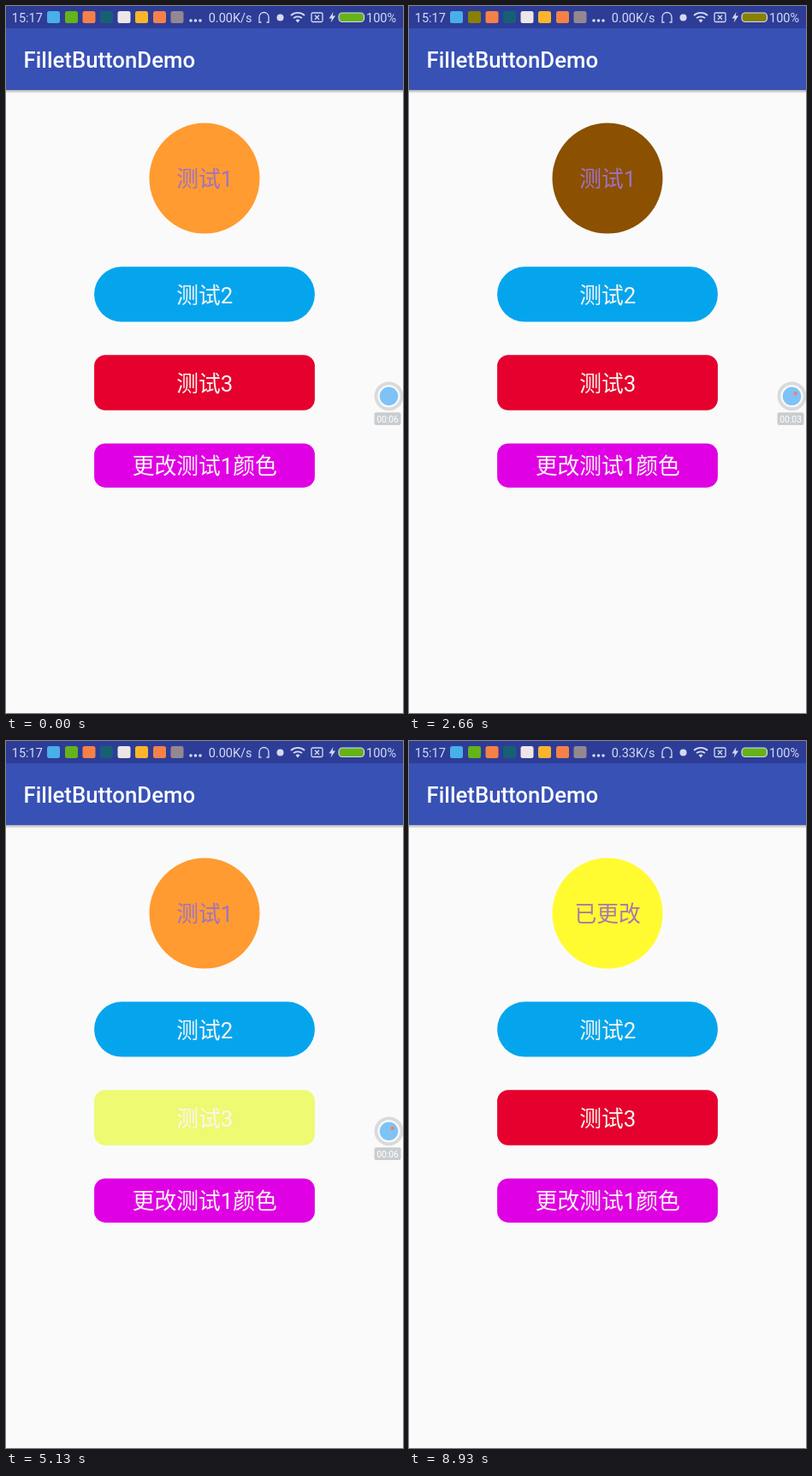
These frames come from a looping animation (464x825 px, 9310 ms). An HTML page:

```html
<!DOCTYPE html>
<html lang="zh-CN">
<head>
<meta charset="utf-8">
<title>FilletButtonDemo</title>
<style>
  html, body { margin: 0; width: 100%; height: 100%; overflow: hidden; background: #fafafa; }
  svg { display: block; }
  text { font-family: Roboto, "Noto Sans CJK SC", "Noto Sans CJK", sans-serif; }
  .label { font-size: 25.78px; font-weight: 300; fill: #f8f6f2; text-anchor: middle; }
  .label tspan { font-weight: 400; }
  .status { font-size: 14.5px; fill: #d6daf0; }
  .clock { font-size: 10.3px; fill: #fff; }
  .line { fill: none; stroke: #d6daf0; stroke-width: 1.3; }
  .solid { fill: #d6daf0; }

  /* 49 ticks of 190 ms; every change is a hard cut */
  .anim { animation: 9310ms step-end infinite; }
  #round { animation-name: round; }
  #pill { animation-name: pill; }
  #box { animation-name: box; }
  .charge { animation-name: charge; }
  .before { animation-name: before; }
  .after { animation-name: after; }
  .slow { animation-name: slow; }
  .fast { animation-name: fast; }
  #digits { animation-name: digits; }
  #dot { animation-name: dot; }
  #recorder { animation-name: recorder; }

  @keyframes round {
    0%, 30.612% { fill: #ff9b30; }
    10.204% { fill: #8b5000; }
    75.51%, 100% { fill: #fffb30; }
  }
  @keyframes pill {
    0%, 51.02%, 100% { fill: #05a5ee; }
    34.693% { fill: #00d415; }
  }
  @keyframes box {
    0%, 65.306%, 100% { fill: #e5002d; }
    55.102% { fill: #edfa72; }
  }
  @keyframes charge {
    0%, 51.02%, 100% { fill: #66b21a; }
    10.204% { fill: #8a8000; }
    30.612% { fill: #40c820; }
  }
  @keyframes before { 0% { opacity: 1; } 75.51%, 100% { opacity: 0; } }
  @keyframes after { 0% { opacity: 0; } 75.51%, 100% { opacity: 1; } }
  @keyframes slow { 0% { opacity: 1; } 69.387%, 100% { opacity: 0; } }
  @keyframes fast { 0% { opacity: 0; } 69.387%, 100% { opacity: 1; } }
  @keyframes dot { 0%, 69.387%, 100% { opacity: 0; } 10.204% { opacity: 1; } }
  @keyframes recorder { 0% { opacity: 1; } 93.877%, 100% { opacity: 0; } }
  @keyframes digits {
    0% { transform: translateY(-100px); }
    2.04% { transform: translateY(0); }
    10.204% { transform: translateY(-20px); }
    20.408% { transform: translateY(-40px); }
    30.612% { transform: translateY(-60px); }
    40.816% { transform: translateY(-80px); }
    51.02% { transform: translateY(-100px); }
    61.224% { transform: translateY(-120px); }
    71.428% { transform: translateY(-140px); }
    81.632%, 100% { transform: translateY(-160px); }
  }
</style>
</head>
<body>
<svg width="464" height="825" viewBox="0 0 464 825">
  <defs>
    <linearGradient id="shade" x2="0" y2="1">
      <stop offset="0" stop-color="#000" stop-opacity=".3"/>
      <stop offset="1" stop-color="#000" stop-opacity="0"/>
    </linearGradient>
  </defs>
  <rect width="464" height="825" fill="#fafafa"/>
  <rect y="98" width="464" height="4" fill="url(#shade)"/>
  <rect width="464" height="98" fill="#3851b5"/>
  <rect width="464" height="26" fill="#2d3d97"/>
  <text x="20.6" y="72" font-size="25.78" font-weight="500" fill="#fff">FilletButtonDemo</text>

  <!-- status bar -->
  <text class="status" x="6.8" y="18.6">15:17</text>
  <g>
    <rect x="48" y="6" width="15" height="14" rx="2.5" fill="#48afe8"/>
    <rect class="anim charge" x="69" y="6" width="15" height="14" rx="2.5"/>
    <rect x="89.5" y="6" width="15" height="14" rx="2.5" fill="#f58148"/>
    <rect x="110" y="6" width="15" height="14" rx="2.5" fill="#176074"/>
    <rect x="130.5" y="6" width="15" height="14" rx="2.5" fill="#eee6e6"/>
    <rect x="151" y="6" width="15" height="14" rx="2.5" fill="#fab52c"/>
    <rect x="172" y="6" width="15" height="14" rx="2.5" fill="#f58148"/>
    <rect x="192.5" y="6" width="15" height="14" rx="2.5" fill="#948890"/>
  </g>
  <g class="solid">
    <circle cx="216" cy="17" r="1.8"/>
    <circle cx="221.5" cy="17" r="1.8"/>
    <circle cx="227" cy="17" r="1.8"/>
    <circle cx="320.5" cy="13.5" r="4"/>
    <path d="M382.5 7l-5 7.5h3.3l-1.3 5 5.5-8h-3.3z"/>
    <path d="M341 19.5l-2.5-3a4 4 0 0 1 5 0z"/>
  </g>
  <text class="status anim slow" x="287.5" y="18.6" text-anchor="end">0.00K/s</text>
  <text class="status anim fast" x="287.5" y="18.6" text-anchor="end">0.33K/s</text>
  <g class="line">
    <path d="M296 17v-4a5.5 5.5 0 0 1 11 0v4M296 15v4h2.5M307 15v4h-2.5"/>
    <path d="M333 11a12 12 0 0 1 16 0M336 14.2a7.5 7.5 0 0 1 10 0" stroke-width="1.8"/>
    <rect x="357" y="8" width="13" height="10.5" rx="1.5"/>
    <path d="M361 10.8l5 5m0-5l-5 5"/>
  </g>
  <rect class="anim charge" x="389" y="8" width="29.5" height="10.5" rx="4" stroke="#d6daf0" stroke-width="1.2"/>
  <text class="status" x="421" y="18.6">100%</text>

  <!-- buttons -->
  <circle id="round" class="anim" cx="232" cy="201.1" r="64.5"/>
  <text class="label anim before" x="232.2" y="211.2" style="fill: #a072c4">测试<tspan>1</tspan></text>
  <text class="label anim after" x="232.2" y="211.2" style="fill: #a878b0">已更改</text>
  <rect id="pill" class="anim" x="103.1" y="304.2" width="257.8" height="64.4" rx="32.2"/>
  <text class="label" x="232.2" y="346.5">测试<tspan>2</tspan></text>
  <rect id="box" class="anim" x="103.1" y="407.3" width="257.8" height="64.4" rx="12.9"/>
  <text class="label" x="232.2" y="449.6">测试<tspan>3</tspan></text>
  <rect x="103.1" y="510.4" width="257.8" height="51.5" rx="12.9" fill="#e000e4"/>
  <text class="label" x="232.2" y="546.3">更改测试<tspan>1</tspan>颜色</text>

  <!-- floating recorder -->
  <g id="recorder" class="anim">
    <circle cx="447.5" cy="455.3" r="15" fill="#fafafa" stroke="#d9dadb" stroke-width="3.8"/>
    <circle cx="447.5" cy="455.3" r="10.8" fill="#7fc3f6"/>
    <circle id="dot" class="anim" cx="451.7" cy="452" r="2.2" fill="#f08070"/>
    <rect x="430.5" y="474.3" width="31" height="14.7" rx="2" fill="#c9cdd0"/>
    <text class="clock" x="433.2" y="485.6">00:0</text>
    <svg x="453" y="474" width="8" height="15" overflow="hidden">
      <text id="digits" class="clock anim"><tspan x="0" y="11.6">1</tspan><tspan x="0" dy="20">2</tspan><tspan x="0" dy="20">3</tspan><tspan x="0" dy="20">4</tspan><tspan x="0" dy="20">5</tspan><tspan x="0" dy="20">6</tspan><tspan x="0" dy="20">7</tspan><tspan x="0" dy="20">8</tspan><tspan x="0" dy="20">9</tspan></text>
    </svg>
  </g>
</svg>
</body>
</html>
```
